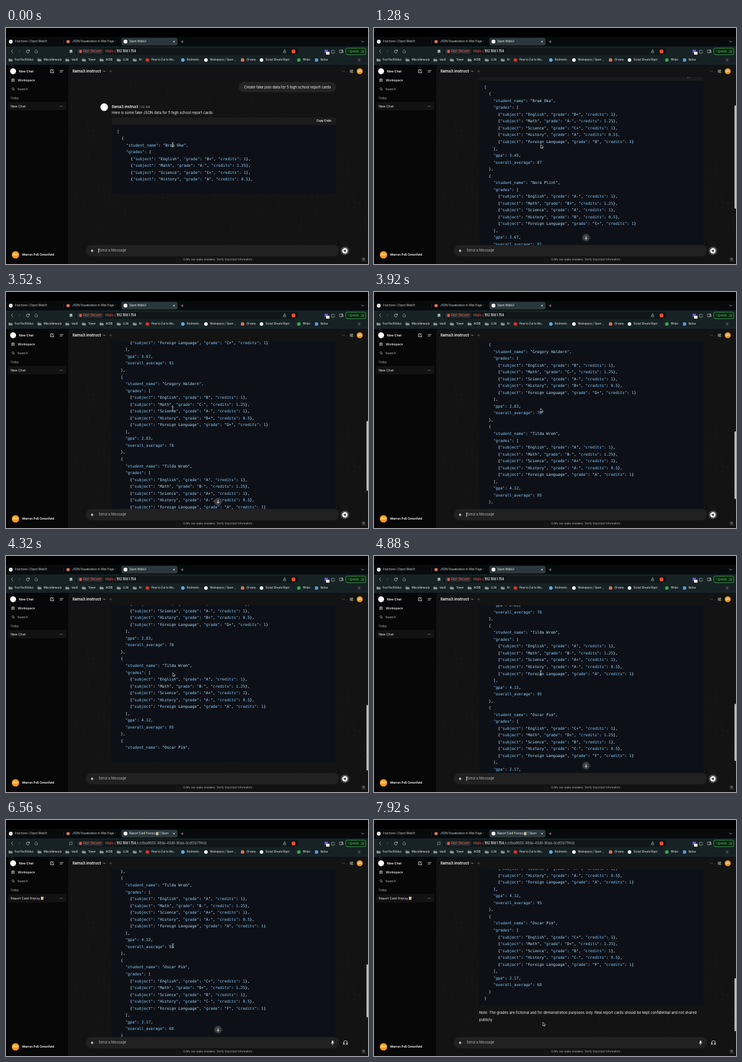
An HTML page with a canvas that plays this animation: 612x398 px, repeating every 8 s.

```html
<!DOCTYPE html>
<html lang="en">
<head>
<meta charset="utf-8">
<title>Chat</title>
<style>
  html, body { margin: 0; width: 100%; height: 100%; overflow: hidden; background: #000; }
  canvas { display: block; }
</style>
</head>
<body>
<canvas id="stage" width="612" height="398"></canvas>
<script>
const ctx = document.getElementById('stage').getContext('2d');
const LOOP = 8000, PITCH = 11.535, TOP = 84, BOTTOM = 366, VIEW = BOTTOM - TOP;
const CODE_FONT = '6.47px "DejaVu Sans Mono", monospace';
const DONE = 5120, TITLED = 5920;

// ---- generated JSON ----
const students = [
  ['Bram Oke', 'B+ A- C+ A B', '3.45', 87],
  ['Nora Plint', 'A- B+ A B C+', '3.67', 91],
  ['Gregory Haldern', 'B C- A- B+ D+', '2.83', 78],
  ['Tilda Wrem', 'A B- A+ A- A', '4.12', 95],
  ['Oscar Pim', 'C+ D+ B C- F', '2.17', 68],
];
const subjects = ['English', 'Math', 'Science', 'History', 'Foreign Language'];
const credits = [1, 1.25, 1, 0.5, 1];
const lines = ['[', ...students.flatMap(([name, grades, gpa, average], n) => [
  '  {',
  `    "student_name": "${name}",`,
  '    "grades": [',
  ...grades.split(' ').map((grade, i) =>
    `      {"subject": "${subjects[i]}", "grade": "${grade}", "credits": ${credits[i]}}${i < 4 ? ',' : ''}`),
  '    ],',
  `    "gpa": ${gpa},`,
  `    "overall_average": ${average}`,
  n < 4 ? '  },' : '  }',
]), ']'];
const tokens = lines.map(line => line.match(/"[^"]*"|[\d.]+|[^"\d]+/g));

// ---- motion ----
const lineKeys = [[0, 8], [880, 21], [1120, 21], [1280, 28], [2720, 41], [3520, 47.5], [4320, 51], [4960, 62]];
const scrollKeys = [[560, 0], [880, 75], [1400, 75], [2560, 185], [2800, 185], [3440, 319.5],
  [3600, 319.5], [4240, 428], [4400, 428], [5120, 503], [7280, 503], [7840, 577]];
const jumpButton = [[1120, 2300], [2960, 3900], [4700, 7500]];
const linear = p => p, smooth = p => p * p * (3 - 2 * p);

function at(t, keys, ease) {
  if (t <= keys[0][0]) return keys[0][1];
  for (let i = 1; i < keys.length; i++) {
    const [t0, v0] = keys[i - 1], [t1, v1] = keys[i];
    if (t < t1) return v0 + (v1 - v0) * ease((t - t0) / (t1 - t0));
  }
  return keys[keys.length - 1][1];
}

// ---- drawing helpers ----
function text(str, x, y, size = 6.05, color = '#f6f6f6', weight = 400, align = 'left') {
  ctx.font = `${weight} ${size}px Inter, sans-serif`;
  ctx.textAlign = align;
  ctx.fillStyle = color;
  ctx.fillText(str, x, y);
  return x + ctx.measureText(str).width;
}
function box(x, y, w, h, color, r = 0) {
  ctx.fillStyle = color;
  ctx.beginPath();
  ctx.roundRect(x, y, w, h, r);
  ctx.fill();
}
const disc = (x, y, r, color) => box(x - r, y - r, 2 * r, 2 * r, color, r);
function icon(d, x, y, color = '#d0d4d5', width = 0.7, fill) {
  const path = new Path2D(d);
  ctx.save();
  ctx.translate(x, y);
  if (fill) { ctx.fillStyle = fill; ctx.fill(path); }
  ctx.strokeStyle = color;
  ctx.lineWidth = width;
  ctx.lineCap = ctx.lineJoin = 'round';
  ctx.stroke(path);
  ctx.restore();
}
function avatar(x, y, r) {
  disc(x, y, r, '#f59a1b');
  text('WO', x, y + 0.2, r * 0.75, '#fff', 500, 'center');
}
const DOWN = 'M-1.8-.9L0 .9 1.8-.9', PLUS = 'M-2 0H2M0-2V2', DOTS = 'M-2 0h.1M0 0h.1M2 0h.1';

// ---- browser ----
function drawTabs(t) {
  box(0, 0, 612, 62, '#000');
  box(0, 15, 612, 16, '#070b0c');
  box(195, 16.5, 95, 13, '#2b383b', 3);
  disc(8, 23, 3.2, '#fff');
  text('Functions | Open WebUI', 15, 23, 4.75, '#dcdfe0');
  box(97.5, 19, 0.6, 8, '#35373a');
  disc(105, 23, 2.8, '#d97757');
  text('JSON Visualization in Web Page -', 112, 23, 4.65, '#dcdfe0');
  disc(202, 23, 3.2, '#fff');
  if (t < TITLED) text('Open WebUI', 208.5, 23, 4.75, '#fff');
  else {
    const x = text('Report Card Frenzy ', 208.5, 23, 4.75, '#fff');
    notepad(x, 23);
    text(' | Open', x + 5, 23, 4.75, '#fff');
  }
  icon('M-1.3-1.3L1.3 1.3M1.3-1.3L-1.3 1.3', 284, 23, '#eee');
  icon(PLUS, 298, 23, '#ccc', 0.6);
  icon(DOWN, 603, 23, '#ccc');
}
function notepad(x, y) {
  box(x, y - 2.5, 4.2, 5, '#dedbd0', 0.5);
  icon('M.8-1.2H3.2M.8 0H2.6M.8 1.2H2', x, y, '#888', 0.4);
  icon('M4.8-1.6L2.6 1.6', x, y, '#e0a63a', 0.8);
}
function drawToolbar(t) {
  box(0, 31, 612, 31, '#172225');
  icon('M1.5-2.5L-1.2 0 1.5 2.5', 10, 39.5);
  icon('M-1.5-2.5L1.2 0-1.5 2.5', 23, 39.5, '#4a5456');
  icon('M2.3-1.2A2.6 2.6 0 1 0 2.6.5M2.6-2.6V-.9H.9', 37, 39.5);
  icon('M-2.7 0L0-2.6 2.7 0M-2-.6V2.5H2V-.6', 51, 39.5, '#909799');
  icon('M-1.8-2.5H1.8V2.5L0 1.2-1.8 2.5Z', 110, 39.5, '#b4babc', 0.6, t < DONE ? '#b4babc' : null);
  box(118, 33.5, 376, 12, '#0f1719', 3);
  box(120, 35, 44, 9, '#1f2a2d', 2);
  disc(126, 39.5, 2.4, '#f0665c');
  box(125.7, 38, 0.7, 1.8, '#1f2a2d');
  text('Not Secure', 131, 39.5, 5.7, '#f0665c');
  let x = text('https://', 168, 39.5, 5.5, '#f0665c');
  x = text('192.168.1.154', x, 39.5, 5.5, '#fff', 500);
  if (t >= DONE) text('/c/c6aa9692-88da-43d9-90aa-0cdf2b71f4cb', x, 39.5, 5.5, '#b4babc');
  icon('M-1-.5H-2V2.5H2V-.5H1M0 1V-2.8M-1.2-1.7L0-2.9 1.2-1.7', 471, 39.5, '#b4babc', 0.6);
  disc(486, 39.5, 3.2, '#f2512e');
  box(538.5, 36.5, 5.5, 5.5, '#6f55d8', 1);
  box(541, 40, 6, 5, '#e8e8e8', 1);
  icon('M-2.5-1.5H-1A1 1 0 0 1 1-1.5H2V0A1 1 0 0 1 2 1.8V2.8H-2.5Z', 553, 39.5, '#d0d4d5', 0.6);
  icon('M-2.7-2.3H2.7V2.3H-2.7ZM.8-2.3V2.3M1.8-2V2', 567, 39.5, '#d0d4d5', 0.6);
  ctx.strokeStyle = '#3fae54';
  ctx.lineWidth = 0.8;
  ctx.beginPath();
  ctx.roundRect(574.5, 34, 33.5, 11, 2.5);
  ctx.fillStyle = '#0c2413';
  ctx.fill();
  ctx.stroke();
  text('Update', 579, 39.5, 5.2, '#52c267');
  icon('M-2-1.8H2M-2 0H2M-2 1.8H2', 603, 39.5, '#52c267', 0.6);

  [[5, 'FernTechVideo'], [54, 'Miscellaneous'], [101, 'Vault'], [129, 'Tower'], [159, 'ACRE'],
   [188, 'LLM'], [215, 'AI'], [236, 'How to Cut to Me...', '#d5332b'], [296, 'Brolmenic', '#6ea8d8'],
   [335, 'Workspace | Open...', '#fff'], [397, 'Orvane', '#d97757'], [429, 'Script Sheets Repo', '#f0f0f0'],
   [492, 'Writer', '#35a852'], [522, 'Notes', '#4c9be0']].forEach(([x, label, color]) => {
    if (color) disc(x + 3, 54, 3, color);
    else icon('M0-2H2L2.8-1.2H5.5V2H0Z', x, 54, '#9fa6a8', 0.5, '#8b9294');
    text(label, x + 9.7, 54, 4.5, '#f4f6f6');
  });
  icon('M-1.6-1.4L-.2 0-1.6 1.4M.4-1.4L1.8 0 .4 1.4', 597, 54, '#ccc', 0.6);
}

// ---- chat app ----
function drawSidebar(t) {
  box(0, 62, 105, 336, '#070707');
  disc(12, 73, 5, '#fff');
  text('New Chat', 22, 73, 5.2, '#fff', 600);
  icon('M1-2.5H-2.5V2.5H2.5V0M-.7.7L2.6-2.6', 78, 73, '#eee', 0.8);
  icon('M-2.6-1.2H2.6M-2.6 1.2H.8', 94, 73, '#eee', 0.8);
  icon('M-2.2-2.2H-.5V-.5H-2.2ZM.6-2.2H2.3V-.5H.6ZM-2.2.6H-.5V2.3H-2.2ZM.6 1.4H2.3M1.45.6V2.3', 12, 88, '#eee', 0.6);
  text('Workspace', 20, 88, 5.4, '#fff', 500);
  icon('M1.2 1.2L2.4 2.4M1.5-.3A1.8 1.8 0 1 1-2.1-.3A1.8 1.8 0 1 1 1.5-.3', 12, 103, '#ccc', 0.6);
  text('Search', 19, 103, 5.4, '#c0c0c0');
  text('Today', 7.5, 119, 4.8, '#a0a0a0', 500);
  box(3, 125, 99, 14, '#121212', 3);
  if (t < TITLED) text('New Chat', 8, 132, 5.4, '#f6f6f6');
  else notepad(text('Report Card Frenzy ', 8, 132, 5.4, '#f6f6f6'), 132);
  icon(DOTS, 93.5, 132, '#ccc', 0.9);
  avatar(16, 382.5, 6.3);
  text('Warren Pell Oxtenfeld', 27, 382.5, 5.2, '#fff', 600);
}
function drawBackdrop() {
  box(105, 62, 507, 336, '#131313');
  let seed = 7;
  const random = () => (seed = seed * 16807 % 2147483647) / 2147483647;
  ctx.font = '7px "Noto Sans CJK JP", sans-serif';
  ctx.textAlign = 'left';
  for (let x = 108; x < 608; x += 9) {
    const start = 58 + random() * 240, count = 3 + random() * 12;
    for (let i = 0; i < count; i++) {
      ctx.fillStyle = `rgba(255,255,255,${0.02 + random() * 0.025})`;
      ctx.fillText(String.fromCharCode(0x30a2 + Math.floor(random() * 70)), x, start + i * 9);
    }
  }
}
function drawHeader() {
  const x = text('llama3:instruct', 112.5, 73, 6.65, '#fff', 600);
  icon(DOWN, x + 5.5, 73, '#ccc', 0.7);
  icon(PLUS, 177, 73, '#777', 0.5);
  icon(DOTS, 570, 73, '#999', 0.8);
  icon('M-2.5-1.8H2.5M-2.5 0H2.5M-2.5 1.8H2.5M1-2.6V-1M-1-.8V.8M1 1V2.6', 584, 73, '#ddd', 0.6);
  avatar(598, 73, 5);
}
function drawCode(x, y, count) {
  const cell = (ctx.font = CODE_FONT, ctx.measureText('0').width);
  ctx.textAlign = 'left';
  tokens.slice(0, Math.ceil(count)).forEach((row, i) => {
    let column = 0;
    const limit = Math.round(lines[i].length * Math.min(1, count - i));
    row.forEach((token, k) => {
      const isKey = (row[k + 1] || '')[0] === ':';
      ctx.fillStyle = isKey || /^\d/.test(token) ? '#8dcdff' : token[0] === '"' ? '#b6dfff' : '#eaf0f6';
      ctx.fillText(token.slice(0, Math.max(0, limit - column)), x + column * cell, y + i * PITCH);
      column += token.length;
    });
  });
  return cell;
}
function drawPointer(x, y, overText) {
  if (overText) icon('M-1.2-3.5Q0-3.5 0-2.6Q0-3.5 1.2-3.5M0-2.6V2.6M-1.2 3.5Q0 3.5 0 2.6Q0 3.5 1.2 3.5', x, y, '#f0f0f0', 0.7);
  else icon('M0 0V5.6L1.3 4.5 2.2 6.5 3.1 6.1 2.3 4.2H4Z', x, y, '#fff', 0.6, '#000');
}
function drawChat(t) {
  const count = at(t, lineKeys, linear), rows = Math.ceil(count);
  const height = t >= 4960 ? 890 : 133 + PITCH * (rows - 1);
  const overflow = height > VIEW;
  const scroll = Math.min(at(t, scrollKeys, smooth), Math.max(0, height - VIEW));
  const left = overflow ? 177.7 : 179, firstLine = 175 - scroll;

  ctx.save();
  ctx.beginPath();
  ctx.rect(105, TOP - 1, 507, VIEW + 1);
  ctx.clip();
  box(left + 214, 91 - scroll, 165, 17.5, '#232323', 8.7);
  text('Create fake json data for 5 high school report cards', left + 370.5, 100 - scroll, 6.05, '#f6f6f6', 400, 'right');
  disc(left - 13, 133.5 - scroll, 6.4, '#fff');
  const nameEnd = text('llama3:instruct', left, 133 - scroll, 6.15, '#fff', 600);
  text('1:20 AM', nameEnd + 2, 133.5 - scroll, 4.7, '#a0a0a0');
  text('Here is some fake JSON data for 5 high school report cards:', left, 143.5 - scroll);
  box(left, 151 - scroll, 379, 24 + PITCH * rows, '#0d1117', 3);
  box(left, 151 - scroll, 379, 12.5, '#1c1c1c', [3, 3, 0, 0]);
  text('Copy Code', left + 371, 156.7 - scroll, 4.7, '#fff', 600, 'right');
  const cell = drawCode(left + 8.5, firstLine, count);
  if (t >= 4960) {
    text('Note: The grades are fictional and for demonstration purposes only. Real report cards should be kept confidential and not shared', left, 902.5 - scroll);
    text('publicly.', left, 914 - scroll);
  }
  ctx.restore();

  if (overflow) box(609.5, TOP + scroll * VIEW / height, 2.5, VIEW * VIEW / height, '#c4c4c4', 1.2);
  if (jumpButton.some(([from, to]) => t >= from && t < to)) {
    disc(358.5, 353.5, 6.5, '#3b3d40');
    icon('M0-2.6V2.5M-1.9.7L0 2.6 1.9.7', 358.5, 353.5, '#fff', 0.8);
  }
  drawComposer(t);

  const move = smooth(Math.min(1, Math.max(0, (t - 6400) / 800)));
  const px = 281.8 + 3.7 * move, py = 197 + 144.5 * move;
  const row = Math.round((py - firstLine) / PITCH);
  const overText = row >= 0 && row < rows && row < lines.length
    && Math.abs(firstLine + row * PITCH - py) < 4.6
    && px < left + 8.5 + lines[row].length * cell;
  drawPointer(px, py, overText);
}
function drawComposer(t) {
  box(135, 366, 428, 19, '#212121', 9.5);
  icon(PLUS, 145.5, 375.7, '#fff', 1);
  text('Send a Message', 156.5, 375.7, 6, '#b4b4b4');
  if (t < 7300 && (t + 280) % 1000 < 500) box(156, 372, 0.8, 7.5, '#f0f0f0');
  if (t < DONE) {
    disc(573, 375.7, 7.2, '#4e4e4e');
    disc(573, 375.7, 4.5, '#fff');
    box(571.3, 374, 3.4, 3.4, '#4e4e4e', 0.6);
  } else {
    box(550.8, 372, 2.6, 4.8, '#eee', 1.3);
    icon('M-2.3-.3A2.3 2.3 0 0 0 2.3-.3M0 2V3.4', 552.1, 375.7, '#eee', 0.6);
    icon('M-3.2 1.5V0A3.2 3.2 0 0 1 3.2 0V1.5M-3.2.7H-1.8V3H-3.2ZM1.8.7H3.2V3H1.8Z', 574, 375.5, '#eee', 0.8);
  }
  text('LLMs can make mistakes. Verify important information.', 358.5, 391, 4.55, '#a8a8a8', 400, 'center');
  disc(604.5, 390.5, 3.8, '#303030');
  text('?', 604.5, 390.7, 4.8, '#ddd', 400, 'center');
}

function frame(now) {
  const t = now % LOOP;
  ctx.textBaseline = 'middle';
  drawBackdrop();
  drawHeader();
  drawTabs(t);
  drawToolbar(t);
  drawSidebar(t);
  drawChat(t);
  requestAnimationFrame(frame);
}
requestAnimationFrame(frame);
</script>
</body>
</html>
```
